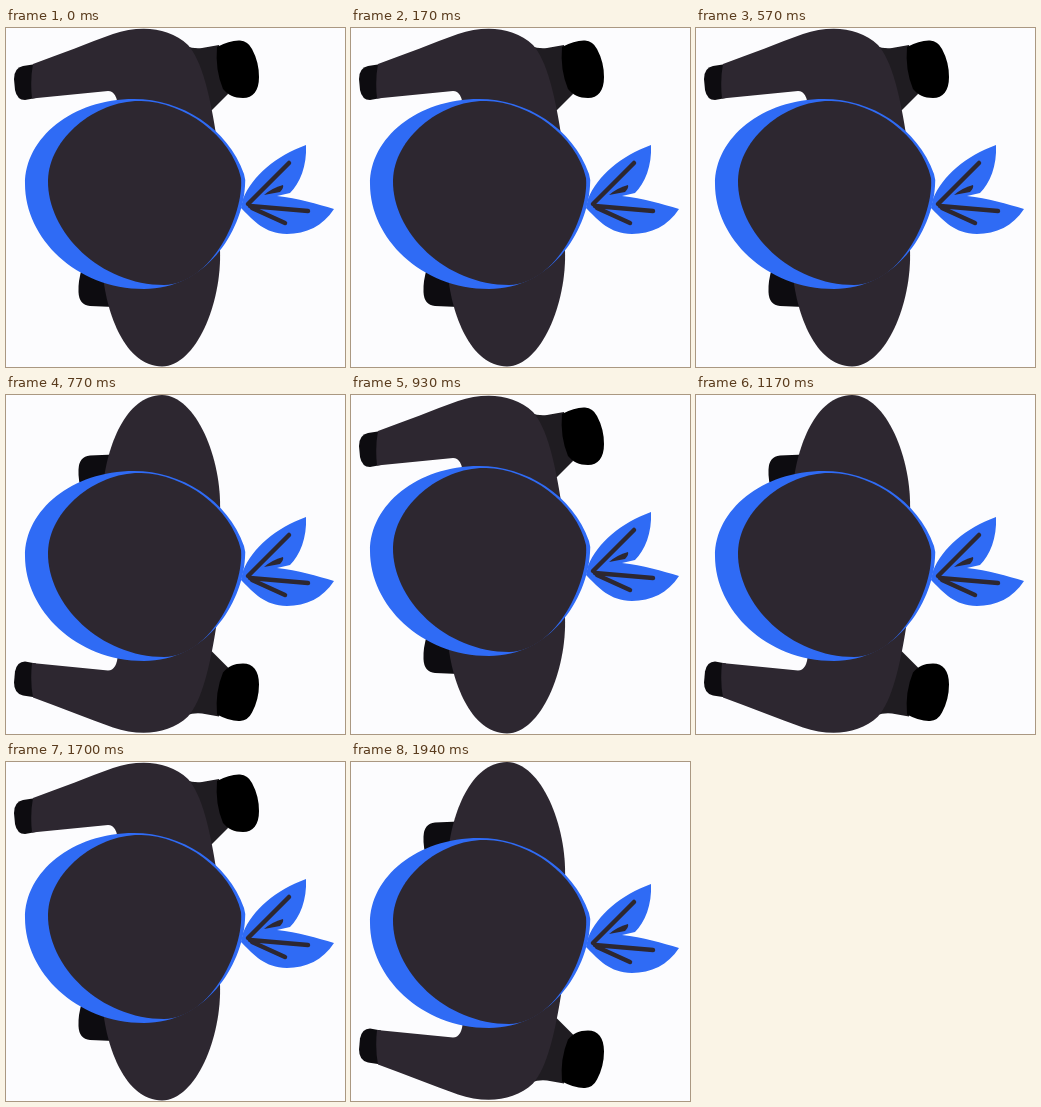
These frames come from a looping animation (339x339 px, 1.98 s). An HTML page with a canvas:

```html
<!DOCTYPE html>
<html lang="en">
<head>
<meta charset="utf-8">
<title>Running ninja</title>
<style>
html, body { margin: 0; width: 100%; height: 100%; overflow: hidden; background: #fcfcfe; }
canvas { display: block; width: 339px; height: 339px; }
</style>
</head>
<body>
<canvas id="stage" width="339" height="339"></canvas>
<script>
const ctx = document.getElementById('stage').getContext('2d');
const LOOP = 1980, STEP = 200;
const SUIT = '#2d2730', SHADE = '#1f1c21', GLOVE = '#0d0c10', BAND = '#2f6bf5', BLACK = '#000';

const shape = (d, color) => ({ path: new Path2D(d), color });

const limbs = [
  // far leg and shoe
  shape('M180 18 Q188 21 196 20 L213 17 L222 66 L206 82 L190 90 Z', SHADE),
  shape('M211 19 Q224 12 234 12.500 Q242 13 246 21 Q253 34 253 49 C253 63 247 70 237 70 C228 70 222 67 217 61 Q209 42 211 19 Z', BLACK),
  // hand
  shape('M30 36 L17 38 Q8 40 8 51 L9 62 Q11 72 19 72 L30 70 Z', GLOVE),
  // rear foot
  shape('M76 240 Q72 253 72.500 264 Q73 277 84 278 L108 279 L104 240 Z', GLOVE),
  // arm and shoulder
  shape('M27 36 C55 26 82 15 107 6 C134 -3 163 -1 182 17 C196 33 204 66 211 112 L160 130 L112 80 Q111 63 102 63 L26 70.500 Q24 52 27 36 Z', SUIT),
  // lower body
  shape('M97 248 C101 286 119 338 156 338.500 C190 338 216 275 214 222 L160 190 Z', SUIT)
];

const head = [
  // knot ends
  shape('M235 180 L237 171 C246 148 270 128 300 117 C301 138 294 155 284 165 L271 168 C292 170 311 176 328 181 C317 198 300 206 281 206 C258 205 249 194 236 181 Z', BAND),
  shape('M258 167 Q266 160 277 157 Q278 160 274 164 Z', SUIT),
  // headband and hood
  shape('M19 156 C19 110 66 71 128 71 C175 71 222 100 238 146 Q240 152 239 158 C236 205 199 261 138 261 C70 261 19 210 19 156 Z', BAND),
  shape('M42 152 C43 110 90 72 135 73 C178 74 225 107 235 150 C238 186 206 256 158 257 C95 257 41 205 42 152 Z', SUIT)
];

function fill(list) {
  for (const { path, color } of list) {
    ctx.fillStyle = color;
    ctx.fill(path);
  }
}

function crease(x1, y1, x2, y2) {
  ctx.beginPath();
  ctx.moveTo(x1, y1);
  ctx.lineTo(x2, y2);
  ctx.stroke();
}

function drawHead() {
  fill(head);
  ctx.strokeStyle = SUIT;
  ctx.lineWidth = 4.5;
  ctx.lineCap = 'round';
  crease(242, 176, 283, 135);
  crease(244, 178, 302, 183);
  crease(246, 180, 279, 195);
}

function draw(now) {
  const flipped = Math.floor((now % LOOP) / STEP) % 2 === 1;
  ctx.fillStyle = '#fcfcfe';
  ctx.fillRect(0, 0, 339, 339);

  ctx.save();
  if (flipped) ctx.transform(1, 0, 0, -1, 0, 338.5);
  fill(limbs);
  ctx.restore();

  ctx.save();
  if (flipped) ctx.translate(0, 5);
  drawHead();
  ctx.restore();
}

const start = performance.now();
function tick() {
  draw(performance.now() - start);
  requestAnimationFrame(tick);
}
tick();
</script>
</body>
</html>
```
